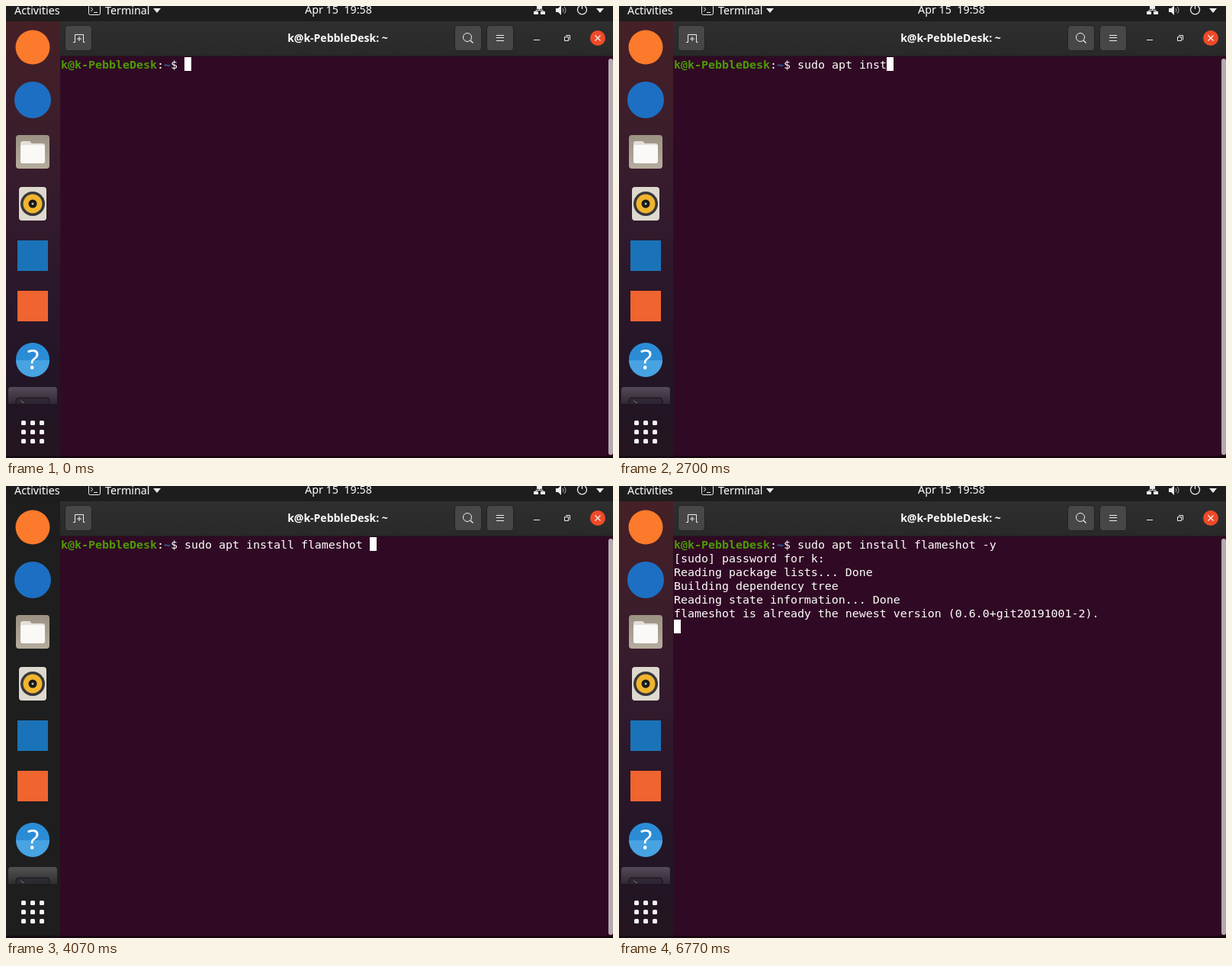
Write an HTML page that moves like this. It is 796 by 592 pixels and loops after 6.87 s.

```html
<!DOCTYPE html>
<html lang="en">
<head>
<meta charset="utf-8">
<title>Terminal</title>
<style>
  html, body { margin: 0; width: 100%; height: 100%; overflow: hidden; background: #1d1d1d; }
  svg { display: block; }
  text { white-space: pre; fill: #fff; }
  .ui { font: 14.3px "Noto Sans", sans-serif; fill: #e8e8e8; }
  .title { font-weight: 700; font-size: 14px; text-anchor: middle; fill: #fff; }
  .term { font: 14.95px "DejaVu Sans Mono", monospace; }
  .user { font-weight: 700; fill: #4e9a06; }
  .path { font-weight: 700; fill: #3465a4; }
  .line { fill: none; stroke: #eee; }
  .button { fill: #474747; stroke: #222; }
</style>
</head>
<body>
<svg width="796" height="592" viewBox="0 0 796 592">
  <defs>
    <linearGradient id="dockFill" x2="0" y2="1">
      <stop offset="0" stop-color="#452026"/>
      <stop offset=".35" stop-color="#371c2d"/>
      <stop offset=".6" stop-color="#2b182b"/>
      <stop offset=".85" stop-color="#211525"/>
      <stop offset="1" stop-color="#24161f"/>
    </linearGradient>
    <linearGradient id="barFill" x2="0" y2="1">
      <stop offset="0" stop-color="#2f2f2f"/><stop offset="1" stop-color="#292929"/>
    </linearGradient>
    <linearGradient id="filesFill" x2="0" y2="1">
      <stop offset="0" stop-color="#9c9283"/><stop offset="1" stop-color="#b5ac9d"/>
    </linearGradient>
    <linearGradient id="tileFill" x2="0" y2="1">
      <stop offset="0" stop-color="#fff" stop-opacity=".23"/><stop offset="1" stop-color="#fff" stop-opacity=".08"/>
    </linearGradient>
  </defs>

  <!-- window -->
  <rect width="796" height="592" fill="#1d1d1d"/>
  <rect x="71" y="20" width="725" height="46" fill="url(#barFill)"/>
  <rect x="71" y="66" width="725" height="524" fill="#300a24"/>
  <rect x="71" y="65" width="725" height="1" fill="#1c1c1c"/>
  <rect x="71" y="589" width="725" height="3" fill="#18050f"/>
  <rect x="790" y="69" width="6" height="519" rx="3" fill="#b4aab0"/>

  <!-- top bar -->
  <g class="ui">
    <text x="11" y="11">Activities</text>
    <text x="130" y="11">Terminal</text>
    <text x="392" y="10">Apr 15  19:58</text>
  </g>
  <rect class="line" x="108.5" y="-1.5" width="15" height="13" rx="2"/>
  <path class="line" d="M111 2l3 2.500l-3 2.500M115 8.500h5"/>
  <path d="M193 3h10l-5 6zM774 3h10l-5 6z" fill="#eee"/>
  <path d="M696-1h7v5h-7zM692 7h6v4h-6zM701 7h6v4h-6z" fill="#eee"/>
  <path class="line" d="M699.500 3v3M695 7v-1.500h9V7"/>
  <path d="M721 3h3l4-4v13l-4-4h-3z" fill="#eee"/>
  <path class="line" d="M730 3q2 2.500 0 5M732 1q4 4.500 0 9" stroke-opacity=".7"/>
  <path class="line" d="M752 0a6 6 0 1 0 7 0M755.500-2v6" stroke-width="1.300"/>

  <!-- header bar -->
  <rect class="button" x="77.500" y="25.500" width="35" height="33" rx="4"/>
  <rect class="button" x="588.500" y="25.500" width="35" height="33" rx="4"/>
  <rect class="button" x="630.500" y="25.500" width="35" height="33" rx="4"/>
  <path class="line" d="M88 47.500h2.500v-10h11v10h2M96 40v6M93 43h6"/>
  <circle class="line" cx="605" cy="41" r="5.500"/>
  <path class="line" d="M609 45l3.500 3.500" stroke-width="1.300"/>
  <path class="line" d="M643 38.500h10M643 41.500h10M643 45.500h10M692 44.500h8"/>
  <path class="line" d="M732.500 40.500h5v5h-5zM734 38.500h5.500v6"/>
  <text class="ui title" x="435" y="47">k@k-PebbleDesk: ~</text>
  <circle cx="776" cy="42" r="10" fill="#ee4b28"/>
  <path class="line" d="M772.500 38.500l7 7m0-7l-7 7" stroke-width="1.400"/>

  <!-- dock -->
  <rect id="dock" y="20" width="71" height="572"/>
  <rect y="589" width="71" height="3" fill="#160d14"/>
  <circle cx="35" cy="54" r="22.500" fill="#fb7a2b"/>
  <circle cx="35" cy="123" r="24" fill="#1d6fc4"/>
  <rect x="13" y="169" width="44" height="44" rx="4" fill="url(#filesFill)"/>
  <path d="M19 180q0-3 3-3h9l3 3h14q3 0 3 3v20q0 3-3 3H22q-3 0-3-3z" fill="#e3e0da"/>
  <rect x="19" y="182" width="32" height="24" rx="3" fill="#faf9f7"/>
  <rect x="17" y="237" width="36" height="44" rx="4" fill="#ded9cf"/>
  <circle cx="35" cy="259" r="16" fill="#38383a"/>
  <circle cx="35" cy="259" r="12.500" fill="#f0b42e"/>
  <circle cx="35" cy="259" r="5.500" fill="#19191b"/>
  <circle cx="35" cy="259" r="1.500" fill="#bbb"/>
  <rect x="15" y="307" width="40" height="40" fill="#1a73b8"/>
  <rect x="15" y="373" width="40" height="40" fill="#f0642f"/>
  <circle cx="35" cy="463" r="22" fill="#2b8cd6"/>
  <path d="M13 464a22 22 0 0 0 44 0z" fill="#47a3e2"/>
  <text x="35.500" y="476" font-size="36" font-family="Noto Sans, sans-serif" text-anchor="middle">?</text>
  <path d="M3 521v-18q0-4 4-4h56q4 0 4 4v18z" fill="url(#tileFill)"/>
  <path d="M13 521v-4q0-4 4-4h36q4 0 4 4v4" fill="#2c262f" fill-opacity=".7" stroke="#18131a"/>
  <path class="line" d="M19 517l5 3" stroke-opacity=".4"/>
  <g id="grid" fill="#f4f2f3"></g>

  <!-- terminal -->
  <g class="term">
    <text x="72" y="82"><tspan class="user">k@k-PebbleDesk</tspan>:<tspan class="path">~</tspan>$ </text>
    <text id="command" x="234" y="82"></text>
    <g id="output"></g>
  </g>
  <rect id="caret" width="9" height="18" fill="#fff"/>
  <g id="pointer">
    <path d="M-3-6.500h7M.5-6.500v13M-3 6.500h7" stroke="#fff" stroke-width="3"/>
    <path d="M-2-6.500h5M.5-6.500v13M-2 6.500h5" stroke="#111"/>
  </g>
</svg>
<script>
const LOOP = 6870, CELL = 9, ROW = 18, LEFT = 72, TOP = 67, PROMPT = 18;
const NS = 'http://www.w3.org/2000/svg';
const $ = id => document.getElementById(id);

function add(parent, tag, attrs) {
  const node = document.createElementNS(NS, tag);
  for (const key in attrs) node.setAttribute(key, attrs[key]);
  return parent.appendChild(node);
}

for (let i = 0; i < 9; i++)
  add($('grid'), 'rect', { x: 20 + i % 3 * 12, y: 543 + Math.floor(i / 3) * 12, width: 6, height: 6, rx: 1.5 });

const command = 'sudo apt install flameshot -y';
const keyTimes = [
  1400, 1550, 1650, 1750, 1960, 2030, 2100, 2250, 2325, 2400,
  2600, 2600, 2700, 2800, 2900, 2980, 3060, 3160, 3260, 3360,
  3430, 3510, 3720, 3720, 3820, 3920, 4020, 4250, 4380];

const password = '[sudo] password for k: ';
const reading = 'Reading package lists... ';
const building = 'Building dependency tree';
// Each screen replaces the lines below the prompt; the caret follows the last one.
const screens = [
  [0, []],
  [4840, [password]],
  [6470, [password, reading + '0%']],
  [6570, [password, reading + 'Done', building + '... 0%']],
  [6770, [password, reading + 'Done', building, 'Reading state information... Done',
    'flameshot is already the newest version (0.6.0+git20191001-2).', '']]
];
const rows = Array.from({ length: 6 }, (_, i) =>
  add($('output'), 'text', { x: LEFT, y: TOP + 15 + (i + 1) * ROW }));

const within = (t, from, to) => t >= from && t < to;
const show = (id, on) => $(id).setAttribute('visibility', on ? 'visible' : 'hidden');

function draw(t) {
  const typed = keyTimes.filter(time => time <= t).length;
  $('command').textContent = command.slice(0, typed);

  const lines = screens.findLast(([start]) => start <= t)[1];
  rows.forEach((row, i) => row.textContent = lines[i] ?? '');

  const column = lines.length ? lines.at(-1).length : PROMPT + typed;
  $('caret').setAttribute('x', LEFT + column * CELL);
  $('caret').setAttribute('y', TOP + lines.length * ROW);
  show('caret', !within(t, 330, 850) && !within(t, 5400, 5860));

  // The pointer slows down and bends upwards on its way to the prompt.
  const step = Math.min(1, Math.max(0, Math.floor((t - 50) / 55) / 11));
  const left = (1 - step) ** 3;
  $('pointer').setAttribute('transform',
    `translate(${Math.round(281 + 410 * left ** 1.2)} ${Math.round(79 + 383 * left)})`);
  show('pointer', within(t, 50, 1400));

  $('dock').setAttribute('fill', within(t, 4070, 4120) ? '#1e1e1e' : 'url(#dockFill)');
}

function tick() {
  draw(performance.now() % LOOP);
  requestAnimationFrame(tick);
}
tick();
</script>
</body>
</html>
```
